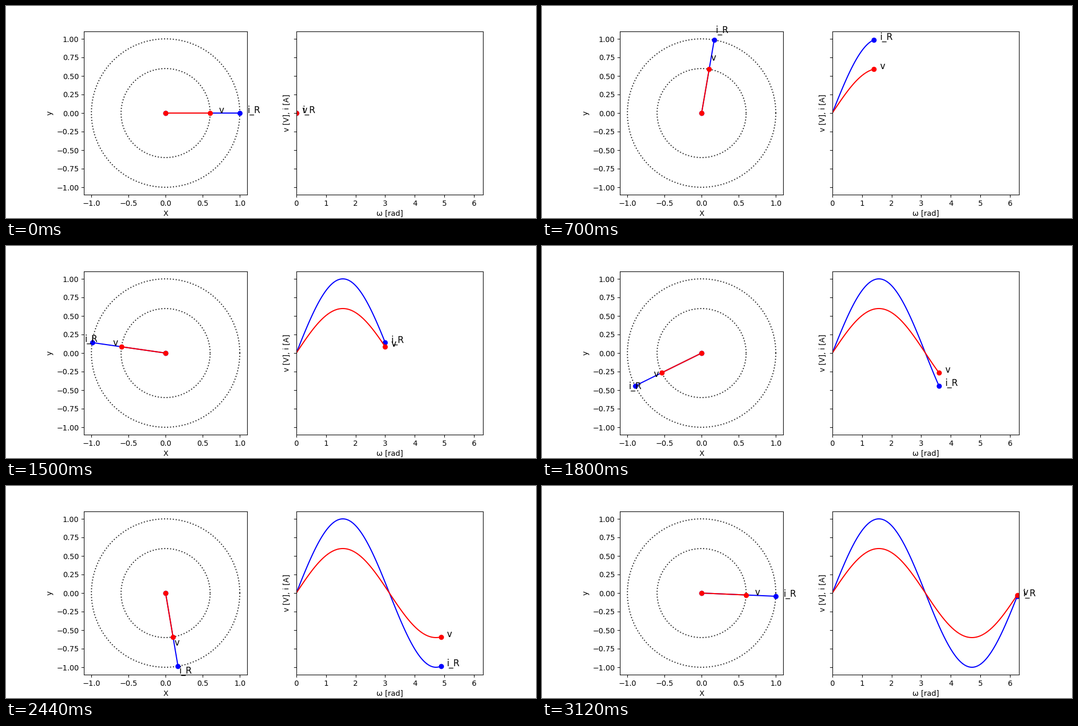
A matplotlib script for the animation above (3.14 s loop, 1000 by 400 pixels).

```python
import numpy as np
import matplotlib.pyplot as plt
from matplotlib.animation import FuncAnimation

STEP = 0.04
FRAMES = 157
INTERVAL = 20
# label, amplitude, colour, label distance along the phasor
SIGNALS = [("i_R", 1.0, "blue", 1.1), ("v", 0.6, "red", 1.2)]

fig, (left, right) = plt.subplots(1, 2, sharey=True, figsize=(10, 4), dpi=100)

left.set_aspect("equal")
left.set(xlim=(-1.1, 1.1), ylim=(-1.1, 1.1), xlabel="X", ylabel="y")
right.set(xlim=(0, 6.3), xlabel="ω [rad]", ylabel="v [V], i [A]")
left.set_xticks(np.arange(-1, 1.1, 0.5))
left.set_yticks(np.arange(-1, 1.1, 0.25))

turn = np.linspace(0, 2 * np.pi, 200)
for _, amp, _, _ in SIGNALS:
    left.plot(amp * np.cos(turn), amp * np.sin(turn), ":", color="black", alpha=0.8)


def make_parts(label, color):
    arm, = left.plot([], [], "o-", color=color)
    wave, = right.plot([], [], color=color)
    dot, = right.plot([], [], "o", color=color)
    arm_text = left.text(0, 0, label, fontsize=12)
    wave_text = right.text(0, 0, label, fontsize=12)
    return arm, wave, dot, arm_text, wave_text


parts = [make_parts(label, color) for label, _, color, _ in SIGNALS]


def update(frame):
    angle = STEP * frame
    past = STEP * np.arange(frame + 1)
    for (_, amp, _, reach), group in zip(SIGNALS, parts):
        arm, wave, dot, arm_text, wave_text = group
        x, y = amp * np.cos(angle), amp * np.sin(angle)
        arm.set_data([0, x], [0, y])
        wave.set_data(past, amp * np.sin(past))
        dot.set_data([angle], [y])
        arm_text.set_position((reach * x, reach * y))
        wave_text.set_position((angle + 0.2, y))
    return [artist for group in parts for artist in group]


anim = FuncAnimation(fig, update, frames=FRAMES, interval=INTERVAL,
                     init_func=lambda: update(0), repeat=True, repeat_delay=0)
plt.show()
```
